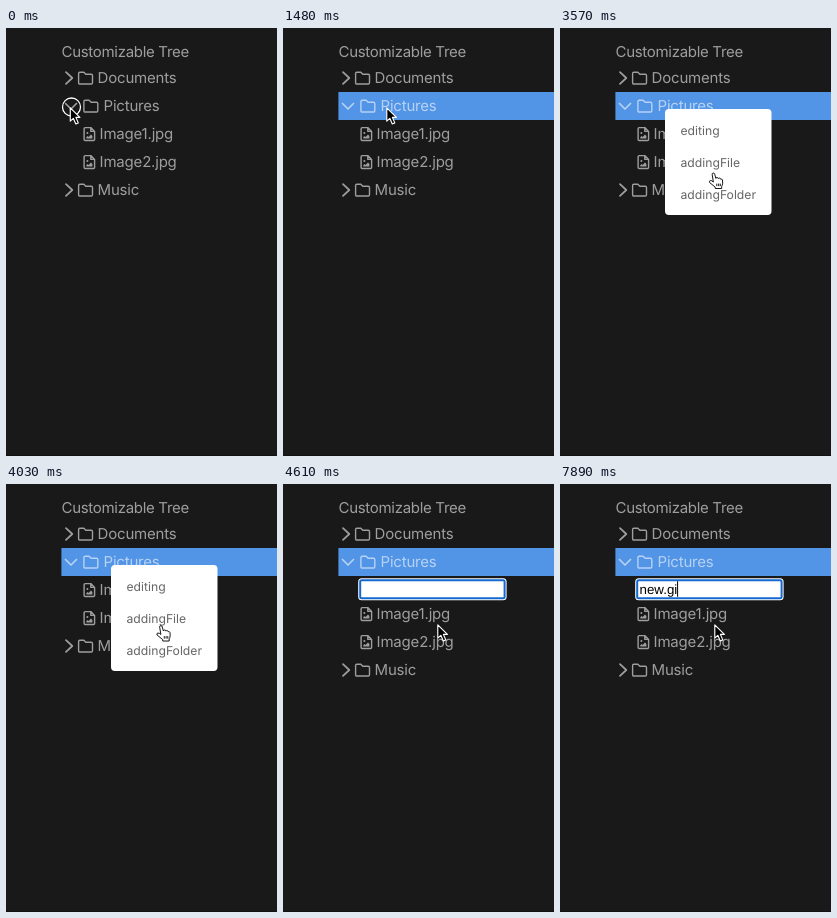
An HTML page for the animation above (8 s loop, 271 by 428 pixels).

```html
<!DOCTYPE html>
<html lang="en">
<head>
<meta charset="utf-8">
<title>Customizable Tree</title>
<style>
  html, body { margin: 0; width: 100%; height: 100%; overflow: hidden; background: #191919; }
  svg { display: block; width: 271px; height: 428px; }
  text { font: 15px Inter, "Open Sans", sans-serif; letter-spacing: -.2px; fill: #fff; fill-opacity: .58; white-space: pre; text-rendering: geometricPrecision; }
  .title { letter-spacing: -.3px; }
  .icon { fill: none; stroke: #fff; stroke-opacity: .58; stroke-width: 1.4; stroke-linejoin: round; stroke-linecap: round; }
  .chevron { stroke-width: 1.75; }
  #menu text { font-size: 12.2px; letter-spacing: 0; fill: #666; fill-opacity: 1; }
  #typed { font: 13.333px "Liberation Sans", Arial, sans-serif; letter-spacing: 0; fill: #000; fill-opacity: 1; }
  #ring circle { fill: none; }
</style>
</head>
<body>
<svg viewBox="0 0 271 428">
  <defs>
    <path id="closedMark" class="icon chevron" d="M60 -5.8 L66.3 0 L60 5.8"/>
    <path id="openMark" class="icon chevron" d="M59.5 -2.5 L65 3 L70.5 -2.5"/>
    <path id="folder" class="icon" d="M1.8 -5.8 h4 l2 2 h5.5 q1.2 0 1.2 1.2 v7.4 q0 1.2 -1.2 1.2 h-11.5 q-1.2 0 -1.2 -1.2 v-9.4 q0 -1.2 1.2 -1.2z"/>
    <g id="picture" class="icon">
      <path d="M79.2 -6.4 h5.6 l3.8 3.8 v8 q0 1.1 -1.1 1.1 h-8.3 q-1.1 0 -1.1 -1.1 v-10.7 q0 -1.1 1.1 -1.1z M84.8 -6.2 v3.6 h3.6"/>
      <path d="M80.3 4.4 v-1.2 l1.3 -1.3 1 1 2.4 -2.4 1.4 1.4 v2.5z" fill="#fff" fill-opacity=".58" stroke="none"/>
      <circle cx="81.4" cy="-1" r="1" fill="#fff" fill-opacity=".58" stroke="none"/>
    </g>
  </defs>

  <rect width="271" height="428" fill="#191919"/>
  <rect y="427" width="271" height="1" fill="#131012"/>
  <rect id="highlight" x="55.4" y="64" width="216" height="28" fill="#5294e6"/>

  <text class="title" x="55.5" y="29.1">Customizable Tree</text>
  <g transform="translate(0 50)">
    <use href="#closedMark"/><use href="#folder" x="72"/><text x="91.6" y="5.4">Documents</text>
  </g>
  <g transform="translate(0 78)">
    <g id="closedRow"><use href="#closedMark"/><use href="#folder" x="72"/><text x="91.6" y="5.4">Pictures</text></g>
    <g id="openRow"><use href="#openMark"/><use href="#folder" x="77.3"/><text x="97.5" y="5.4">Pictures</text></g>
  </g>
  <g id="files">
    <g transform="translate(0 106)"><use href="#picture"/><text x="93.6" y="5.2">Image1.jpg</text></g>
    <g transform="translate(0 134)"><use href="#picture"/><text x="93.6" y="5.2">Image2.jpg</text></g>
  </g>
  <g id="music">
    <use href="#closedMark"/><use href="#folder" x="72"/><text x="91.6" y="5.4">Music</text>
  </g>

  <g id="input">
    <rect x="75.2" y="94.3" width="148.4" height="22" rx="3.5" fill="#fff"/>
    <rect x="77.2" y="96.3" width="144.4" height="18" rx="1.5" fill="#fff" stroke="#1468d0" stroke-width="2"/>
    <text id="typed" x="79.5" y="109.6"></text>
    <rect id="caret" y="97.2" width="1" height="15.6"/>
  </g>

  <g id="menu">
    <rect x="105" y="81" width="106.5" height="106" rx="4" fill="#fff"/>
    <text x="120.5" y="106.5">editing</text>
    <text x="120.5" y="138.5">addingFile</text>
    <text x="120.5" y="170.5">addingFolder</text>
  </g>

  <g id="pointer">
    <g id="ring">
      <circle cx="1.5" cy="-.5" r="9" stroke="#111" stroke-width="2.6"/>
      <circle cx="1.5" cy="-.5" r="9" stroke="#fff" stroke-width="1.3"/>
    </g>
    <path id="arrow" transform="scale(.95)" d="M.3 .3 V14.4 L3.5 11.4 L6.1 17.3 L8.7 16.2 L6.2 10.4 H10.4z" fill="#000" stroke="#fff" stroke-width="1.2" stroke-linejoin="round"/>
    <path id="hand" transform="translate(-1 .6) scale(.92)" d="M.2 2.3 Q0 .5 1.4 .5 T3 2 L4.2 6.3 Q4.5 5.2 5.6 5.3 T6.9 6.5 Q7.6 5.7 8.5 6 T9.5 7.2 Q10.8 6.5 11.4 8 L11.6 11.5 Q11.5 13.5 10.5 15 V17.3 H3.5 V15.8 L-2.6 10.8 Q-3.5 9 -1.8 8.7 T1.5 10.2z M5.2 12 V14.7 M7.2 12 V14.7 M9 12 V14.7" fill="#fff" stroke="#000" stroke-linejoin="round"/>
  </g>
</svg>

<script>
const DURATION = 8000;
const $ = id => document.getElementById(id);
const show = (id, visible) => $(id).style.display = visible ? "" : "none";

// Each step lists only what changes at that time.
const steps = [
  { at: 0, x: 64, y: 79.5, ring: true, open: true, selected: false, menu: 0, hand: false, input: false, text: "", caret: true },
  { at: 150, ring: false, open: false },
  { at: 600, ring: true },
  { at: 740, ring: false, open: true },
  { at: 1040, x: 74 },
  { at: 1190, x: 97 },
  { at: 1330, x: 103.5, ring: true },
  { at: 1480, ring: false, selected: true },
  { at: 2230, ring: true, menu: 1 },
  { at: 2380, ring: false },
  { at: 2530, x: 106, y: 88, hand: true },
  { at: 2680, x: 119, y: 105 },
  { at: 2830, x: 136, y: 121 },
  { at: 2980, x: 146, y: 131 },
  { at: 3280, x: 149, y: 137 },
  { at: 3430, x: 152, y: 142 },
  { at: 3570, x: 153, y: 144 },
  { at: 3720, x: 154, y: 143 },
  { at: 3870, x: 154.5, y: 142 },
  { at: 4010, y: 140.5 },
  { at: 4160, ring: true },
  { at: 4310, ring: false, input: true, menu: .1 },
  { at: 4460, menu: 0 },
  { at: 4610, hand: false, caret: false },
  { at: 5060, text: "n", caret: true },
  { at: 5350, text: "ne" },
  { at: 5500, text: "new" },
  { at: 5950, caret: false },
  { at: 6550, caret: true },
  { at: 6690, text: "new." },
  { at: 7140, caret: false },
  { at: 7440, text: "new.g", caret: true },
  { at: 7890, text: "new.gi" }
];

function render(time) {
  const s = Object.assign({}, ...steps.filter(step => step.at <= time));
  const shift = s.input ? 24 : 0;

  show("highlight", s.selected);
  show("openRow", s.open);
  show("closedRow", !s.open);
  show("files", s.open);
  $("files").setAttribute("transform", `translate(0 ${shift})`);
  $("music").setAttribute("transform", `translate(0 ${(s.open ? 162 : 106) + shift})`);

  show("input", s.input);
  show("caret", s.caret);
  if (s.input) {
    $("typed").textContent = s.text;
    const width = s.text ? $("typed").getComputedTextLength() : 0;
    $("caret").setAttribute("x", 79.3 + width);
  }

  $("menu").style.opacity = s.menu;
  show("ring", s.ring);
  show("hand", s.hand);
  show("arrow", !s.hand);
  $("pointer").setAttribute("transform", `translate(${s.x} ${s.y})`);
}

const start = performance.now();
function tick() {
  render((performance.now() - start) % DURATION);
  requestAnimationFrame(tick);
}
tick();
</script>
</body>
</html>
```
